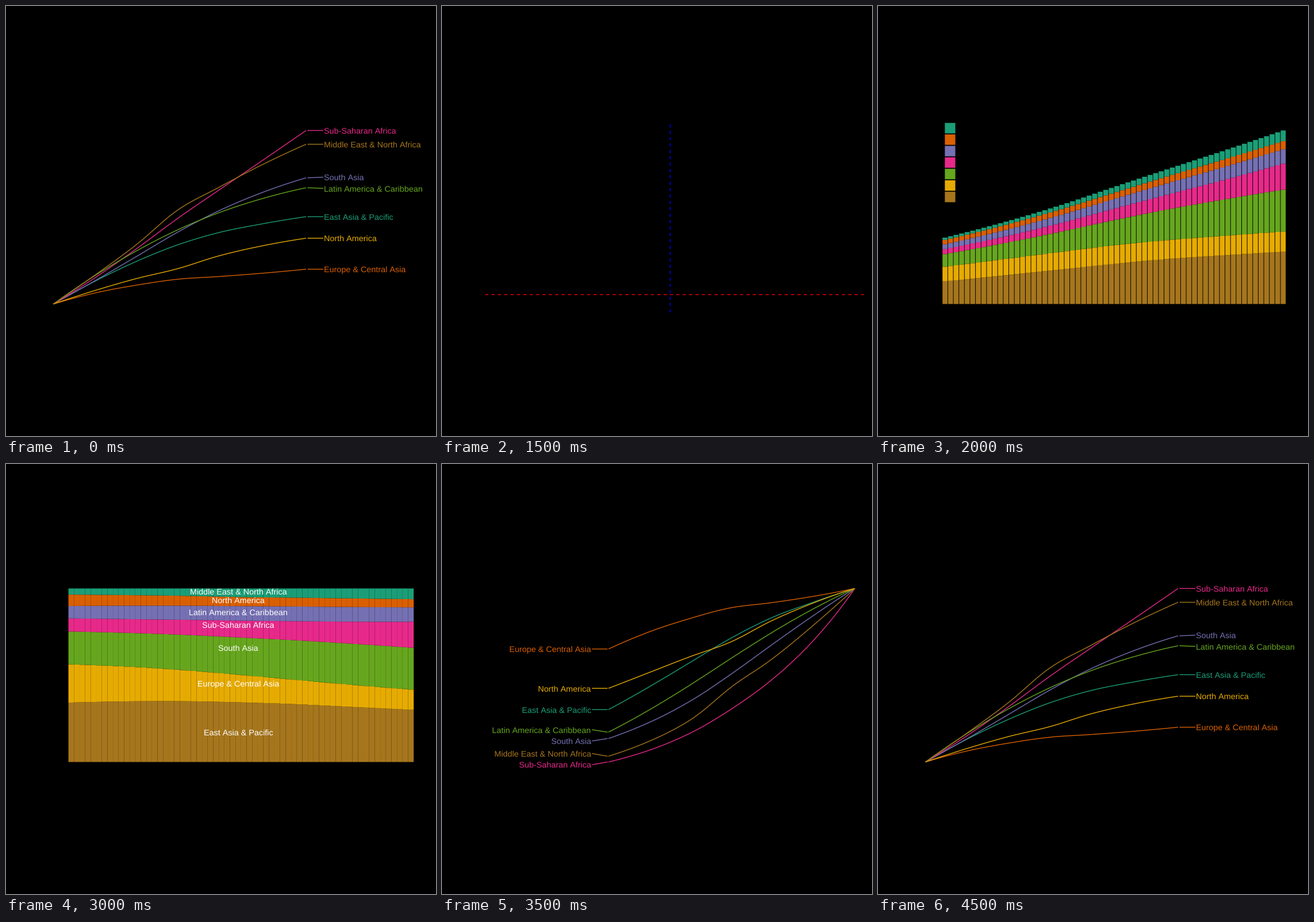
Write a matplotlib script that moves like this. It is 748 px wide and 748 px high and loops after 8 s.

```python
import numpy as np
import matplotlib.pyplot as plt
from matplotlib.animation import FuncAnimation

SIZE, DPI = 748, 100
PT = 72 / DPI                      # points per pixel
SCALE = SIZE / 8 / 96              # an eight inch wide plot
LINE, FONT = 1.4226 * SCALE, 14.72 * SCALE
TOP, BASE = 216.5, 518.4
HEIGHT = BASE - TOP
LEFT, RIGHT, PANEL_TOP, PANEL_BOTTOM = 75, 734, 206, 533
LABEL_GAP = 19.5

plt.rcParams.update({"font.family": "Liberation Sans", "text.hinting": "none",
                     "text.kerning_factor": 6})

# Population in millions, once a decade and in the last year
KEY_YEARS = [0, 10, 20, 30, 40, 50, 61]
POPULATION = {
    "East Asia & Pacific": [1034, 1283, 1549, 1814, 2040, 2208, 2371],
    "Europe & Central Asia": [663, 736, 793, 839, 861, 887, 923],
    "South Asia": [573, 714, 899, 1134, 1391, 1643, 1901],
    "Sub-Saharan Africa": [227, 291, 383, 512, 671, 877, 1181],
    "Latin America & Caribbean": [217, 284, 359, 439, 517, 588, 655],
    "North America": [198, 225, 252, 277, 313, 343, 370],
    "Middle East & North Africa": [106.5, 140, 187, 260, 323, 397, 486],
}
STACK = ["Middle East & North Africa", "North America",
         "Latin America & Caribbean", "Sub-Saharan Africa", "South Asia",
         "Europe & Central Asia", "East Asia & Pacific"]
PALETTE = ["#1B9E77", "#D95F02", "#7570B3", "#E7298A", "#66A61E", "#E6AB02", "#A6761D"]
YEARS = np.arange(KEY_YEARS[-1] + 1)


def smooth(px, py):
    """Cubic Hermite curve through the points, sampled once a year."""
    px, py = np.array(px, float), np.array(py, float)
    slope = np.gradient(py, px, edge_order=2)
    i = np.clip(np.searchsorted(px, YEARS, side="right") - 1, 0, len(px) - 2)
    h = px[i + 1] - px[i]
    u = (YEARS - px[i]) / h
    return ((1 + 2 * u) * (1 - u) ** 2 * py[i] + u * (1 - u) ** 2 * h * slope[i]
            + u ** 2 * (3 - 2 * u) * py[i + 1] + u ** 2 * (u - 1) * h * slope[i + 1])


PEOPLE = {name: np.exp(smooth(KEY_YEARS, np.log(p))) for name, p in POPULATION.items()}
STACKED = np.array([PEOPLE[name] for name in STACK])
FASTEST = PEOPLE["Sub-Saharan Africa"]

fig = plt.figure(figsize=(SIZE / DPI, SIZE / DPI), dpi=DPI, facecolor="black")
ax = fig.add_axes([0, 0, 1, 1])


def stroke(x, y, color, **style):
    ax.plot(x, y, color=color, lw=LINE * PT, snap=False,
            solid_capstyle="butt", dash_capstyle="butt", **style)


def label(x, y, text, color, align):
    ax.text(x, y + 5.2, text, color=color, ha=align, va="baseline", fontsize=FONT * PT)


def dashed(x, y, color):
    stroke(x, y, color, linestyle=(0, (4, 4)))


def vline(x, color):
    dashed([x, x], [PANEL_BOTTOM, PANEL_TOP], color)


def spread(positions):
    """Push neighbours apart until labels no longer touch."""
    y = np.array(positions, float)
    order = np.argsort(y)
    for upper, lower in zip(order, order[1:]):
        push = max(0, LABEL_GAP - (y[lower] - y[upper])) / 2
        y[upper] -= push
        y[lower] += push
    return y


def labelled_lines(curves, span, end, tip, near, far, align):
    x = np.linspace(*span, len(YEARS))
    label_y = spread([y[end] for y in curves])
    for name, color, y, ly in zip(PEOPLE, PALETTE, curves, label_y):
        stroke(x, y, color)
        stroke([tip, near], [y[end], ly], color)
        label(far, ly, name, color, align)


def growth_lines():
    curves = [BASE - HEIGHT * np.log(p / p[0]) / np.log(FASTEST[-1] / FASTEST[0])
              for p in PEOPLE.values()]
    labelled_lines(curves, (82.4, 522), -1, 524.5, 552, 553.4, "left")


def share_of_final_lines():
    curves = [TOP + HEIGHT * (1 - p / p[-1]) / (1 - FASTEST[0] / FASTEST[-1])
              for p in PEOPLE.values()]
    labelled_lines(curves, (289.5, 718.1), 0, 288, 261, 259.2, "right")


def stacked_bars(values, left, right, fill=1.0):
    step = (right - left) / (len(YEARS) - 1 + fill)
    bottom = np.full(len(YEARS), BASE)
    for height, color in zip(values[::-1] * HEIGHT, PALETTE[::-1]):
        ax.bar(left + step * YEARS, -height, step * fill, bottom, align="edge",
               color=color, linewidth=0, snap=False)
        bottom = bottom - height


def legend_keys(x, y):
    for i, color in enumerate(PALETTE):
        ax.add_patch(plt.Rectangle((x, y + 19.95 * i), 18.2, 18.2, fc=color,
                                   lw=0, snap=False))


def blank():
    pass


def two_limits():
    vline(400, "blue")
    vline(669, "red")


def crossing_limits():
    dashed([LEFT, RIGHT], [502, 502], "red")
    vline(397, "blue")


def total_bars():
    stacked_bars(STACKED / STACKED[:, -1].sum(), 112.2, 709.2, 0.9)
    legend_keys(116.3, 203.4)


def share_bars():
    stacked_bars(STACKED / STACKED.sum(axis=0), 97.9, 487.3)
    legend_keys(525.5, 311.2)


def labelled_share_bars():
    shares = STACKED / STACKED.sum(axis=0)
    stacked_bars(shares, 108.6, 709.2)
    middles = np.cumsum(shares[:, 0]) - shares[:, 0] / 2
    for name, middle in zip(STACK, middles):
        label(404, TOP + HEIGHT * middle, name, "white", "center")


SCENES = [growth_lines, blank, two_limits, crossing_limits, total_bars, share_bars,
          labelled_share_bars, share_of_final_lines, blank] + [growth_lines] * 7


def update(frame):
    ax.clear()
    ax.axis("off")
    SCENES[frame]()
    ax.set(xlim=(0, SIZE), ylim=(SIZE, 0))
    return []


anim = FuncAnimation(fig, update, frames=len(SCENES), interval=500,
                     init_func=lambda: [], repeat=True, repeat_delay=0)
plt.show()
```
